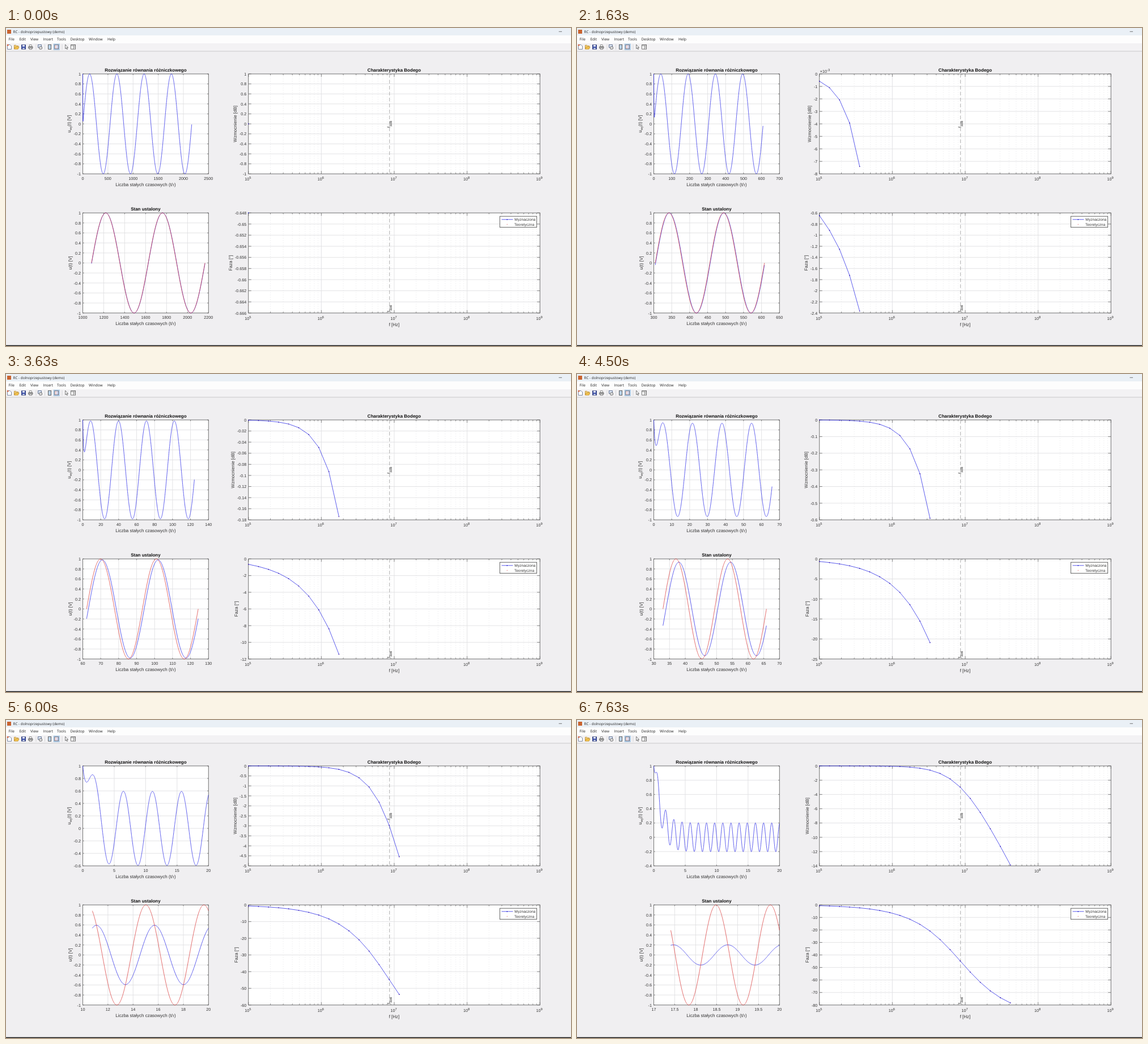
Recreate the animation shown at these times as an HTML page. Size 997 by 561 pixels, loop 7.76 s.

```html
<!DOCTYPE html>
<html lang="pl">
<head>
<meta charset="utf-8">
<title>RC - dolnoprzepustowy (demo)</title>
<style>
  html, body { margin: 0; width: 100%; height: 100%; overflow: hidden; background: #f0eff1; }
  svg { display: block; width: 100%; height: 100%; }
  text { font-family: "Liberation Sans", Arial, sans-serif; font-size: 7.2px; fill: #333; text-rendering: geometricPrecision; }
  .ui { font-family: "Open Sans", "Noto Sans", sans-serif; font-size: 6.5px; fill: #222; }
  .title { font-size: 8px; font-weight: bold; fill: #111; }
  .label { font-size: 8px; }
  .sub { font-size: 5.8px; }
  .tau { font-family: "Liberation Serif", serif; font-style: italic; }
  .mid { text-anchor: middle; }
  .end { text-anchor: end; }
  .box { fill: none; stroke: #6c6c6c; stroke-width: .9; }
  .tick { fill: none; stroke: #555; stroke-width: .7; }
  .grid { fill: none; stroke: #e0e0e2; stroke-width: .9; }
  .minor { fill: none; stroke: #e6e6e8; stroke-width: .7; stroke-dasharray: 1.5 2.5; }
  .cut { fill: none; stroke: #a2a2a2; stroke-width: .9; stroke-dasharray: 6.5 4; }
  .blue, .red { fill: none; stroke-width: .75; stroke-linejoin: round; }
  .blue { stroke: #2525e6; }
  .red { stroke: #d83a3a; }
</style>
</head>
<body>
<svg viewBox="0 0 997 561" preserveAspectRatio="none">
  <rect width="997" height="561" fill="#f0eff1"/>
  <rect width="997" height="13" fill="#eaf0f6"/>
  <rect y="13" width="997" height="14" fill="#fdfdfd"/>
  <rect y="27" width="997" height="13.5" fill="#f3f2f4"/>
  <path d="M0 41H997" stroke="#c4c4c6" stroke-width=".9"/>
  <rect y="559.6" width="997" height="1.4" fill="#111"/>
  <rect x="2" y="3" width="7" height="7" fill="#c9632f"/>
  <text class="ui" x="12.5" y="8.6" style="font-size:6.35px">RC - dolnoprzepustowy (demo)</text>
  <path d="M975.5 6.3H981" stroke="#555" stroke-width=".8"/>
  <g id="menu"></g>
  <g stroke-width=".8">
    <path d="M53 28.5V38.5M68.5 28.5V38.5M99 28.5V38.5" stroke="#cfcfd1"/>
    <path d="M2.5 29.5H7L9.5 32V37.5H2.5Z" fill="#fff" stroke="#5b6a8c"/>
    <circle cx="3.2" cy="30.2" r="1.4" fill="#d9623c"/>
    <path d="M14.5 37V30.3H17.5L18.5 31.5H21.5V33" fill="#f3d07a" stroke="#b98a2c"/>
    <path d="M14.5 37.2L16.3 33.2H23L21.2 37.2Z" fill="#f7c64f" stroke="#b98a2c"/>
    <rect x="27.4" y="29.8" width="7.2" height="7.4" fill="#3c50a8" stroke="#27346f"/>
    <path d="M29 30H33V32.8H29Z" fill="#eef2fc"/>
    <path d="M29.3 35H32.8V37H29.3Z" fill="#cfd6ea"/>
    <path d="M41.3 33V29.5H45L45.8 33" fill="#fff" stroke="#777"/>
    <rect x="39.6" y="32.6" width="7.4" height="3.4" rx=".8" fill="#aaa" stroke="#555"/>
    <path d="M41.2 35.2H45.6V37.6H41.2Z" fill="#fff" stroke="#666"/>
    <rect x="56.5" y="29.6" width="6" height="4.6" fill="#dce6f4" stroke="#4a5c80"/>
    <rect x="58.6" y="33" width="5" height="4.2" rx="1.4" fill="#e8e8e8" stroke="#444"/>
    <rect x="74.6" y="29.3" width="5" height="8.2" fill="#b9d2e8" stroke="#444"/>
    <rect x="84.2" y="28.2" width="10" height="10.2" fill="#cfe3f6" stroke="#86b4dd"/>
    <rect x="85.8" y="29.8" width="6.8" height="7" fill="#fff" stroke="#445"/>
    <path d="M87 32H88.6M87 34.8H88.6" stroke="#d04040"/>
    <path d="M89.5 32H91.6M89.5 34.8H91.6" stroke="#3848b0"/>
    <path d="M104.6 29.2V36.6L106.3 35L107.5 37.7L108.6 37.2L107.4 34.6H109.5Z" fill="#fff" stroke="#444" stroke-width=".7"/>
    <rect x="114.6" y="29.6" width="8" height="7.6" fill="#fff" stroke="#555"/>
    <path d="M114.6 31H122.6M118.8 31V37.2M119.8 33H121.8M119.8 35H121.8" stroke="#555" stroke-width=".7"/>
  </g>
  <g id="plots"></g>
</svg>
<script>
const LOOP = 7760, TICK = 125, HOLD = 390, LEAD = 20;
const POINTS = 30, CUT = 86.2, TAU = 2 * Math.PI;   // cutoff relative to 10^5 Hz
const LEFT = { x0: 135.5, x1: 357.3 }, RIGHT = { x0: 427.8, x1: 942.2 };
const TOP = { y0: 81, y1: 257.3 }, LOW = { y0: 326.2, y1: 502.8 };

const menu = [["File", 4.5], ["Edit", 23.5], ["View", 43], ["Insert", 65.5], ["Tools", 90],
  ["Desktop", 113.5], ["Window", 146], ["Help", 179]];
document.getElementById("menu").innerHTML =
  menu.map(([s, x]) => `<text class="ui" x="${x}" y="21.8">${s}</text>`).join("");

const num = v => String(+v.toPrecision(6));
const path = (d, cls) => `<path class="${cls}" d="${d}"/>`;
const text = (x, y, s, cls = "", more = "") => `<text class="${cls}" x="${x}" y="${y}" ${more}>${s}</text>`;
const upright = (x, y, s, cls) => text(0, 0, s, cls, `transform="translate(${x} ${y}) rotate(-90)"`);
const sub = (s, dy) => `<tspan class="sub" dy="${dy}">${s}</tspan>`;
const dot = (x, y, r, fill) => `<circle cx="${x}" cy="${y}" r="${r}" fill="${fill}"/>`;
const ratio = k => 10 ** (4 * k / (POINTS - 1)) / CUT;
const gain = k => -10 * Math.log10(1 + ratio(k) ** 2);
const angle = k => -Math.atan(ratio(k)) * 360 / TAU;
const phase = k => k ? angle(k) : -0.648;

// Smallest round step that gives at most `most` intervals
function scale(lo, hi, most) {
  for (let e = Math.floor(Math.log10(hi - lo)) - 2; ; e++) {
    for (const m of [1, 2, 5]) {
      const s = m * 10 ** e, a = Math.floor(lo / s + 1e-6), b = Math.ceil(hi / s - 1e-6);
      if (b - a <= most) {
        return { lo: a * s, hi: b * s, ticks: Array.from({ length: b - a + 1 }, (_, i) => (a + i) * s) };
      }
    }
  }
}

const mapper = (a, p, q) => v => p + (v - a.lo) / (a.hi - a.lo) * (q - p);

function line(fn, from, to, n, X, Y) {
  let d = "";
  for (let i = 0; i <= n; i++) {
    const t = from + (to - from) * i / n;
    d += (i ? "L" : "M") + X(t).toFixed(2) + " " + Y(fn(t)).toFixed(2);
  }
  return d;
}

const labelWidth = labels =>
  Math.max(...labels.map(s => [...s].reduce((w, c) => w + (c === "-" ? .333 : c === "." ? .278 : .556), 0))) * 7.2;

function frame(col, row, xs, ys, o) {
  const { x0, x1 } = col, { y0, y1 } = row, len = o.log ? 5 : 2.2;
  const X = mapper(xs, x0, x1), Y = mapper(ys, y1, y0);
  const small = o.log && Math.max(Math.abs(ys.lo), Math.abs(ys.hi)) < .0099;
  const names = ys.ticks.map(v => num(small ? v * 1000 : v));
  let grid = "", minor = "", tick = "", out = "";
  const notch = (x, l) => `M${x} ${y1}v${-l}M${x} ${y0}v${l}`;

  for (const v of xs.ticks) {
    const x = X(v).toFixed(2);
    grid += `M${x} ${y0}V${y1}`;
    tick += notch(x, len);
    out += o.log
      ? text(x - 6.6, y1 + 12, "10" + sub(v, -3.2))
      : text(x, y1 + 10.3, num(v), "mid");
    if (o.log && v < xs.hi) {
      for (let m = 2; m < 10; m++) {
        const mx = X(v + Math.log10(m)).toFixed(2);
        minor += `M${mx} ${y0}V${y1}`;
        tick += notch(mx, 2.5);
      }
    }
  }
  ys.ticks.forEach((v, i) => {
    const y = Y(v).toFixed(2);
    grid += `M${x0} ${y}H${x1}`;
    tick += `M${x0} ${y}h${len}M${x1} ${y}h${-len}`;
    out += text(x0 - 3.5, +y + 2.7, names[i], "end");
  });
  if (small) out += text(x0 + 1, y0 - 2.4, "×10" + sub("-3", -3));

  const cx = (x0 + x1) / 2, cy = (y0 + y1) / 2;
  if (o.title) out += text(cx, y0 - 4, o.title, "title mid");
  if (o.xlabel) out += text(cx, y1 + (o.log ? 23 : 21.2), o.xlabel, "label mid");
  out += upright(x0 - 7.9 + (o.shift || 0) - labelWidth(names), cy, o.ylabel, "label mid");
  const back = `<rect x="${x0}" y="${y0}" width="${x1 - x0}" height="${y1 - y0}" fill="#fff"/>`;
  const box = `<rect class="box" x="${x0}" y="${y0}" width="${x1 - x0}" height="${y1 - y0}"/>`;
  return { X, Y, svg: back + path(minor, "minor") + path(grid, "grid") + path(tick, "tick") + box + out };
}

function bode(row, k, ys, measured, theory, o) {
  const xs = { lo: 5, hi: 9, ticks: [5, 6, 7, 8, 9] };
  const f = frame(RIGHT, row, xs, ys, { ...o, log: true });
  const cut = f.X(5 + Math.log10(CUT));
  let d = "", dots = "";
  for (let i = 0; i <= k; i++) {
    const x = f.X(5 + 4 * i / (POINTS - 1)).toFixed(2), y = f.Y(measured(i)).toFixed(2);
    d += (i ? "L" : "M") + x + " " + y;
    dots += dot(x, y, .85, "#2020c8") + dot(x, f.Y(theory(i)).toFixed(2), .4, "#d83a3a");
  }
  return f.svg + path(`M${cut} ${row.y0}V${row.y1}`, "cut")
    + upright(cut + 1.2, o.mark, "f" + sub("3dB", 3.4)) + path(d, "blue") + dots;
}

function legend() {
  return `<rect x="871.4" y="332.2" width="65.2" height="19.4" fill="#fff" stroke="#555" stroke-width=".9"/>`
    + path("M874.5 337.8H894.5", "blue") + dot(884.3, 337.8, .85, "#2020c8") + dot(884.3, 346.4, .6, "#e06060")
    + text(897, 340.2, "Wyznaczona", "", 'style="font-size:6.5px"')
    + text(897, 348.8, "Teoretyczna", "", 'style="font-size:6.5px"');
}

function scene(k) {
  const w = ratio(k), amp = 1 / Math.hypot(1, w), lag = Math.atan(w), period = TAU / w;
  const end = Math.max(4 * period, 20), from = end - 2 * period;
  const input = t => Math.sin(w * t);
  const steady = t => amp * Math.sin(w * t - lag);
  const output = t => steady(t) + (1 + amp * Math.sin(lag)) * Math.exp(-t);

  let min = 0;
  for (let i = 0; i <= 1500; i++) min = Math.min(min, output(end * i / 1500));
  const time = `Liczba stałych czasowych (t/<tspan class="tau">τ</tspan>)`;
  const a = frame(LEFT, TOP, scale(0, end, 9), scale(min, 1, 10), {
    title: "Rozwiązanie równania różniczkowego", xlabel: time, shift: -1.6,
    ylabel: `u${sub("wy", 2.6)}<tspan dy="-2.6">(t) [V]</tspan>`
  });
  const b = frame(LEFT, LOW, scale(from, end, 9), scale(-1, 1, 10), {
    title: "Stan ustalony", xlabel: time, ylabel: "u(t) [V]", shift: 1.2
  });
  const gains = k ? scale(gain(k), gain(0), 10) : scale(-1, 1, 10);
  const phases = scale(angle(k), phase(0), 10);

  return a.svg + path(line(output, 0, end, 1500, a.X, a.Y), "blue")
    + b.svg + path(line(output, from, end, 500, b.X, b.Y), "blue")
    + path(line(input, from, end, 500, b.X, b.Y), "red")
    + bode(TOP, k, gains, k ? gain : () => 0, k ? gain : () => 0,
      { title: "Charakterystyka Bodego", ylabel: "Wzmocnienie [dB]", mark: 176 })
    + bode(LOW, k, phases, phase, angle, { ylabel: "Faza [°]", xlabel: "f [Hz]", mark: 501 })
    + legend();
}

const plots = document.getElementById("plots"), start = performance.now();
let shown = -1;
function draw() {
  const t = (performance.now() - start) % LOOP;
  const k = Math.floor((Math.floor(t / TICK) * TICK + LEAD) / HOLD);
  if (k !== shown) plots.innerHTML = scene(shown = k);
  requestAnimationFrame(draw);
}
draw();
</script>
</body>
</html>
```
